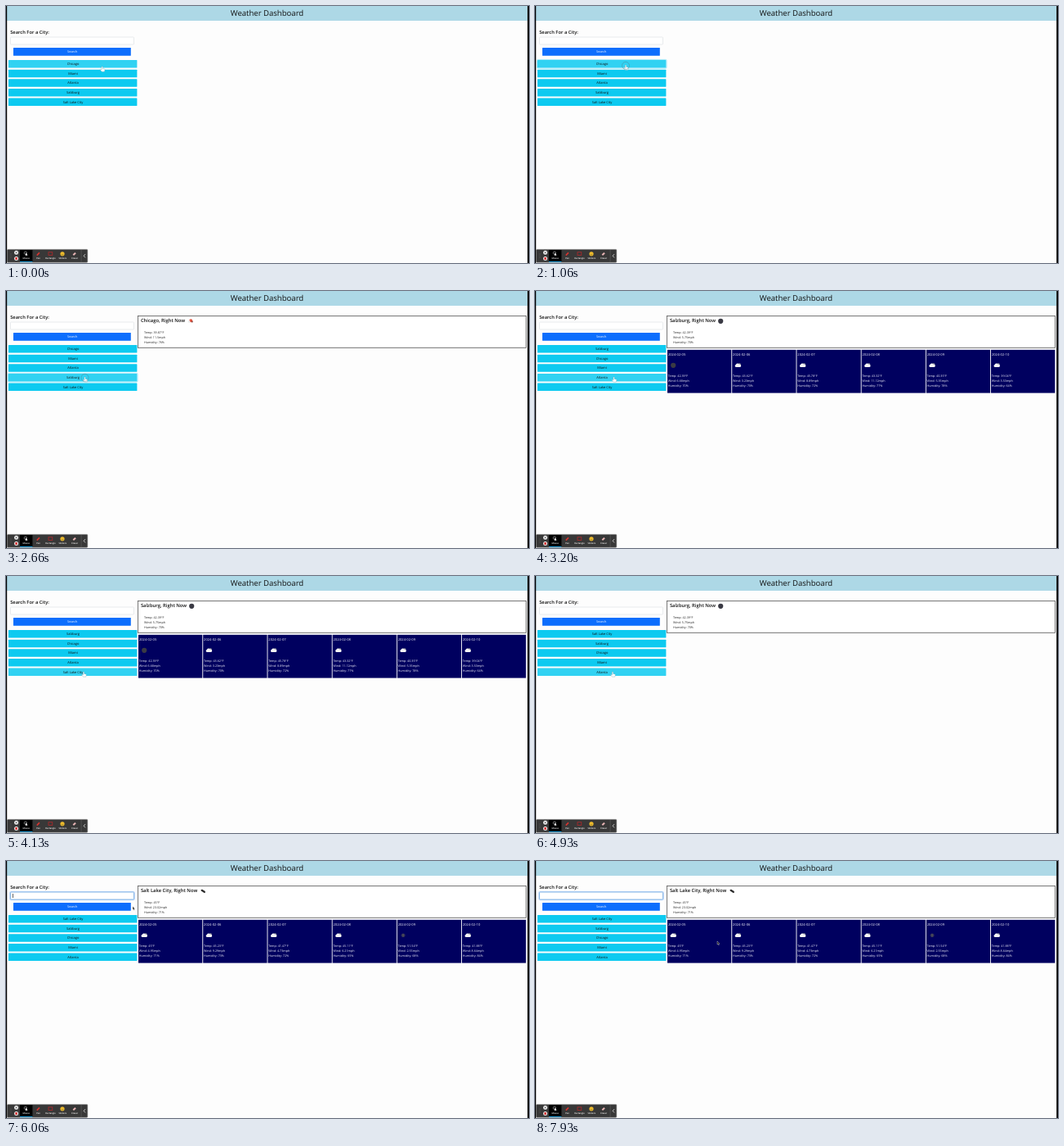
These frames come from a looping animation (640x314 px, 8 s). An HTML page:

```html
<!DOCTYPE html>
<html lang="en">
<head>
<meta charset="utf-8">
<title>Weather Dashboard</title>
<style>
  html, body { margin: 0; width: 100%; height: 100%; overflow: hidden; background: #fdfdfd; }
  svg { display: block; width: 100%; height: 100%; }
  text { font-family: "Open Sans", "Noto Sans", sans-serif; text-rendering: geometricPrecision; white-space: pre; }
</style>
</head>
<body>
<svg id="stage" viewBox="0 0 640 314">
  <rect width="640" height="314" fill="#fdfdfd"/>
  <rect x="1" width="637" height="18" fill="#add8e6"/>
  <g id="page"></g>
  <g id="weather"></g>
  <g id="toolbar"></g>
  <rect width="1.2" height="314" fill="#000"/>
  <rect x="638.2" width="1.8" height="314" fill="#000"/>
  <g id="pointer"></g>
</svg>
<script>
const LOOP = 8000, STEP = 200 / 3;
const $ = id => document.getElementById(id);

function add(parent, tag, attrs, text) {
  const el = document.createElementNS('http://www.w3.org/2000/svg', tag);
  for (const k in attrs) el.setAttribute(k, attrs[k]);
  if (text !== undefined) el.textContent = text;
  parent.appendChild(el);
  return el;
}
const box = (p, x, y, width, height, fill, more) => add(p, 'rect', { x, y, width, height, fill, ...more });
const dot = (p, cx, cy, r, fill, more) => add(p, 'circle', { cx, cy, r, fill, ...more });
const line = (p, d, stroke, width, more) => add(p, 'path', { d, stroke, 'stroke-width': width, fill: 'none', ...more });
const label = (p, x, y, size, text, more) => add(p, 'text', { x, y, 'font-size': size, fill: '#111', ...more }, text);
const show = (el, on) => el.setAttribute('visibility', on ? 'visible' : 'hidden');
const middle = { 'text-anchor': 'middle' };
const medium = { 'font-weight': 500 };
const semi = { 'font-weight': 600 };

// Search column
const page = $('page');
label(page, 319.5, 12.2, 9.55, 'Weather Dashboard', { ...middle, ...medium });
label(page, 5.2, 34, 5.75, 'Search For a City:', semi);
const glow = box(page, 4.6, 37.4, 152.8, 10.2, 'none', { rx: 1, stroke: '#c3dbfd' });
const input = box(page, 5.5, 38, 151, 9, '#fff', { rx: .8, 'stroke-width': .7 });
const caret = box(page, 8.3, 40, .7, 5, '#222');
const search = box(page, 9, 51, 143.8, 9.8, '#0d6efd', { rx: .5 });
label(page, 81.2, 57.3, 3.9, 'Search', { ...middle, fill: '#fff' });

const ROW = 9.6;
const rowTop = i => 66 + i * 11.63;
const ring = box(page, 2.5, 0, 158.5, ROW + 1.2, 'none', { rx: 1.2, stroke: '#a3e9fa' });
const rows = [0, 1, 2, 3, 4].map(i => ({
  bg: box(page, 3, rowTop(i), 157.4, ROW, '#0dcaf0', { rx: .5 }),
  text: label(page, 82, rowTop(i) + 6, 4, '', { ...middle, ...medium })
}));

// Weather icons, drawn around a centre
function cloud(p, x, y, back) {
  dot(p, x + 1.7, y - .9, 1.8, back);
  add(p, 'path', {
    d: `M${x - 2.6} ${y + 2.2}a1.5 1.5 0 0 1 0-2.9a2.1 2.1 0 0 1 3.9-.5a1.6 1.6 0 0 1 1.3 3.4z`, fill: '#f4f4f4'
  });
}
const icons = {
  cloudy: (p, x, y) => cloud(p, x, y, '#70728a'),
  sunny: (p, x, y) => cloud(p, x, y, '#e8743c'),
  night: (p, x, y) => dot(p, x, y, 3.1, '#3a3a44'),
  red(p, x, y) {
    dot(p, x + .8, y - .6, 2, '#e2543f');
    dot(p, x + 2.4, y + .6, 1, '#8a4a45');
    dot(p, x - 1.4, y + .7, 1.4, '#eee');
  },
  broken(p, x, y) {
    line(p, `M${x - 1.4} ${y - 1}l3.2 2`, '#2c2c2c', 2.2, { 'stroke-linecap': 'round' });
  },
  snow(p, x, y) {
    for (const a of [0, 60, 120])
      line(p, `M${x - 2.4} ${y}h4.8`, '#4a4a58', 1.3, { transform: `rotate(${a} ${x} ${y})` });
  }
};

// Visits in order: the click sends the city to the top and loads its weather
const visits = [
  { city: 'Chicago', click: 1000, icon: 'red', at: 225.4, first: 'sunny', now: [39.87, 11.5, 76] },
  { city: 'Salzburg', click: 2600, icon: 'night', at: 227.2, first: 'night', now: [42.39, 5.75, 70] },
  { city: 'Salt Lake City', click: 4730, icon: 'broken', at: 241, fifth: 'snow', now: [45, 23.02, 71] }
];
const REORDER = 180, LOAD = 400;
const cities = ['Chicago', 'Miami', 'Atlanta', 'Salzburg', 'Salt Lake City'];

let seed = 7;
const random = () => (seed = seed * 16807 % 2147483647) / 2147483647;
const vary = (base, spread) => +(base + (random() - .5) * spread).toFixed(2);
const forecastDay = ([temp, , humidity], i) =>
  [vary(temp, i * 4), vary(7, 10), Math.round(vary(humidity, i * 6))];

function readings(p, x, y, [temp, wind, humidity], fill) {
  [`Temp: ${temp}°F`, `Wind: ${wind}mph`, `Humidity: ${humidity}%`]
    .forEach((s, i) => label(p, x, y + i * 6, 3.7, s, { fill, ...medium }));
}

for (const v of visits) {
  v.card = add($('weather'), 'g', {});
  box(v.card, 161.5, 30.5, 475, 38.8, '#fff', { stroke: '#555', 'stroke-width': .8 });
  label(v.card, 164.9, 38.3, 5.85, `${v.city}, Right Now`, semi);
  icons[v.icon](v.card, v.at, 36.8);
  readings(v.card, 169, 51.5, v.now, '#222');

  v.forecast = add($('weather'), 'g', {});
  for (let i = 0; i < 6; i++) {
    const x = 162 + i * 79.2;
    box(v.forecast, x, 71.8, 78.3, 52.8, '#00005f');
    label(v.forecast, x + .9, 79.4, 4.1, '2024-02-' + String(5 + i).padStart(2, '0'), { fill: '#f2f2fa', ...medium });
    const icon = i === 0 && v.first || i === 4 && v.fifth || 'cloudy';
    icons[icon](v.forecast, x + 7.2, 90.8);
    readings(v.forecast, x + .8, 105, forecastDay(v.now, i), '#f2f2fa');
  }
}

// Recorder toolbar
const bar = $('toolbar');
const toolX = i => 24.8 + i * 14.85;
box(bar, 1.6, 297.4, 98.2, 15.9, '#383838', { rx: 1, stroke: '#777', 'stroke-width': .6 });
for (const i of [0, 1, 2]) dot(bar, 6, 303 + i * 2.3, .4, '#999');
for (const y of [301.3, 308.6]) dot(bar, 12.6, y, 2.5, '#eee');
line(bar, 'M11.6 300.3l2 2m0-2l-2 2', '#222', .6);
box(bar, 11.4, 307.1, 2.4, 3, '#d32f2f', { rx: .4 });
box(bar, 17, 298, 15.4, 14.8, '#000');
box(bar, 17, 312, 15.4, 1, '#1d9bd8');
dot(bar, 23.9, 301.8, 1.7, 'none', { stroke: '#ddd', 'stroke-width': .5 });
add(bar, 'path', { d: 'M24 301.5v4l1.1-.9h1.7z', fill: '#fff' });
line(bar, 'M37.8 304.6l3.2-3.2', '#d8342f', 1.6);
box(bar, 52, 300.8, 4.8, 3.8, 'none', { stroke: '#b3282b', 'stroke-width': .8 });
dot(bar, 69, 302.8, 2.6, '#f0bd2c');
line(bar, 'M67.6 303.3q1.4 1.7 2.8 0', '#553', .5);
line(bar, 'M82.3 304.3l2.8-2.6', '#e9b6b6', 2);
['Mouse', 'Pen', 'Rectangle', 'Stickers', 'Eraser'].forEach((s, i) =>
  label(bar, toolX(i), 309.4, 2.6, s, { ...middle, ...semi, fill: '#fff' }));
box(bar, 91.8, 298, .5, 14.8, '#666');
line(bar, 'M97 303.2l-1.9 2.1l1.9 2.1', '#eee', .8);

// Pointer shapes, hot spot at 0,0
const pointer = $('pointer');
const hand = add(pointer, 'path', {
  d: 'M-.6 .2q.6-.6 1.2 0v2l2 .5q.6.2.4.9l-.5 2h-3l-1.8-2.2q.2-.8 1-.3l.7.5z',
  fill: '#fff', stroke: '#6d98a4', 'stroke-width': .3, transform: 'scale(1.1)'
});
const arrow = add(pointer, 'path', {
  d: 'M0 0v4l.9-.8l.7 1.5l.7-.3l-.7-1.4h1.2z', fill: '#111', stroke: '#fff', 'stroke-width': .35
});
const beam = line(pointer, 'M-.8-2.2h1.6M0-2.2v4.4M-.8 2.2h1.6', '#666', .4);
const pulse = dot(pointer, 0, .8, 4.5, 'none', { stroke: '#4d8391', 'stroke-width': .45 });

const start = { x: 117.7, y: 74 };
const moves = [
  { from: 60, to: 460, x: 111, y: 72 },
  { from: 1400, to: 1640, x: 99, y: 103 },
  { from: 2060, to: 2500, x: 96.5, y: 105 },
  { from: 3260, to: 4130, x: 95, y: 117 },
  { from: 5260, to: 5780, x: 130, y: 43 },
  { from: 5890, to: 6040, x: 155, y: 55.5 },
  { from: 6400, to: 7460, x: 223, y: 98 }
];
const FOCUS = 5860, BLINK = 535;
const clicks = [...visits.map(v => v.click), FOCUS];

function place(t) {
  let { x, y } = start;
  for (const m of moves) {
    const u = Math.min(1, Math.max(0, (t - m.from) / (m.to - m.from)));
    const k = u * u * (3 - 2 * u);
    x += (m.x - x) * k;
    y += (m.y - y) * k;
  }
  return { x, y };
}

function cityOrder(t) {
  return visits.filter(v => t >= v.click + REORDER)
    .reduce((list, v) => [v.city, ...list.filter(c => c !== v.city)], cities);
}

function render(t) {
  const { x, y } = place(t);
  const focused = t >= FOCUS;
  const overInput = x < 157 && y > 38 && y < 47;
  const overSearch = x > 9 && x < 153 && y > 51 && y < 61;

  const names = cityOrder(t);
  let overRow = false;
  rows.forEach((row, i) => {
    const hover = x < 160 && y >= rowTop(i) && y <= rowTop(i) + ROW;
    overRow = overRow || hover;
    row.text.textContent = names[i];
    row.bg.setAttribute('fill', hover ? '#31d2f2' : '#0dcaf0');
  });
  const pressed = visits.find(v => t >= v.click && t < v.click + REORDER);
  show(ring, pressed);
  if (pressed) ring.setAttribute('y', rowTop(names.indexOf(pressed.city)) - .6);

  visits.forEach((v, i) => {
    const next = visits[i + 1] || { click: Infinity };
    const loaded = t >= v.click + LOAD;
    show(v.card, loaded && t < next.click + LOAD);
    show(v.forecast, loaded && t < next.click);
  });

  show(glow, focused);
  input.setAttribute('stroke', focused ? '#5b9bd8' : '#dfe2e5');
  show(caret, focused && Math.floor((t - FOCUS) / BLINK) % 2 === 0);
  search.setAttribute('fill', overSearch ? '#0b5ed7' : '#0d6efd');

  const onButton = overRow || overSearch;
  show(hand, onButton);
  show(beam, overInput);
  show(arrow, !onButton && !overInput);
  show(pulse, clicks.some(c => t >= c - 10 && t < c + 130));
  pointer.setAttribute('transform', `translate(${x.toFixed(2)} ${y.toFixed(2)})`);
}

function frame() {
  const t = performance.now() % LOOP;
  render(Math.floor((t + 7) / STEP) * STEP % LOOP);
  requestAnimationFrame(frame);
}
frame();
</script>
</body>
</html>
```
